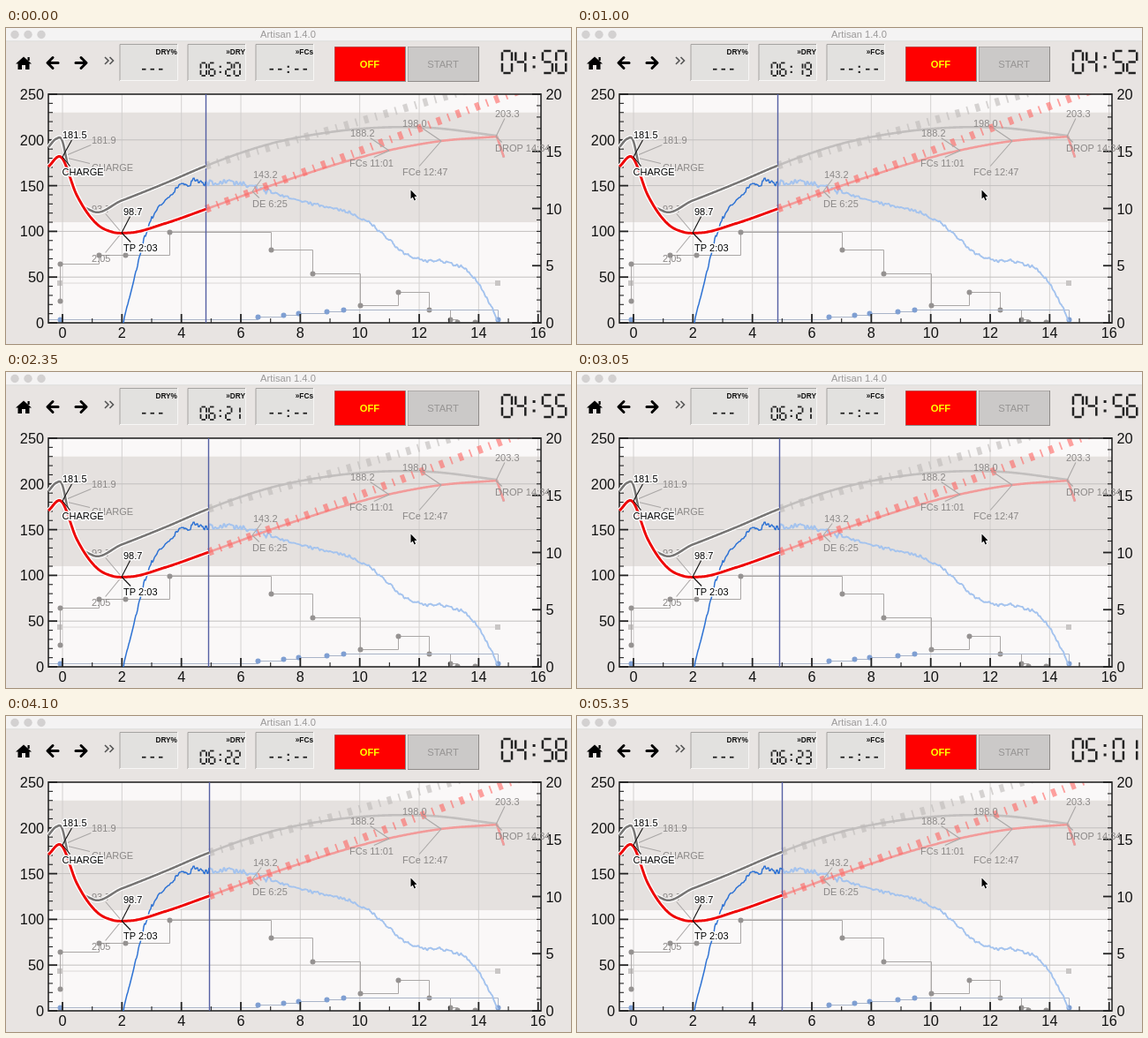
Write an HTML page with a canvas that moves like this. It is 640 by 358 pixels and loops after 5400 ms.

```html
<!DOCTYPE html>
<html lang="en">
<head>
<meta charset="utf-8">
<title>Artisan 1.4.0</title>
<style>
  html, body { margin: 0; width: 100%; height: 100%; overflow: hidden; background: #e8e4e2; }
  canvas { display: block; width: 640px; height: 358px; }
</style>
</head>
<body>
<canvas id="stage"></canvas>
<script>
const LOOP = 5400, W = 640, H = 358;
const FONT = '"Liberation Sans", Arial, sans-serif';
const box = { l: 48, t: 75, r: 606, b: 334 };
const canvas = document.getElementById('stage');
const dpr = window.devicePixelRatio || 1;
canvas.width = W * dpr;
canvas.height = H * dpr;
const c = canvas.getContext('2d');

const minX = m => 64 + 33.67 * m;
const tempY = v => box.b - v * 1.036;
const rateY = v => box.b - v * 12.95;

// Smooth function through key points [x, y, x, y, ...]
function spline(p) {
  const n = p.length / 2, X = i => p[2 * i], Y = i => p[2 * i + 1];
  const rise = i => (Y(i + 1) - Y(i)) / (X(i + 1) - X(i));
  const slope = i => {
    if (i === 0) return rise(0);
    if (i === n - 1) return rise(n - 2);
    const a = X(i) - X(i - 1), b = X(i + 1) - X(i);
    return (rise(i - 1) * b + rise(i) * a) / (a + b);
  };
  return x => {
    let i = 0;
    while (i < n - 2 && x > X(i + 1)) i++;
    const h = X(i + 1) - X(i), u = (x - X(i)) / h, v = 1 - u;
    return (1 + 2 * u) * v * v * Y(i) + u * v * v * h * slope(i) +
      u * u * (3 - 2 * u) * Y(i + 1) - u * u * v * h * slope(i + 1);
  };
}

const drop = x => 3 * Math.max(0, x - 556);
const envBase = spline([48, 135, 57, 125.5, 63, 126, 71, 160, 82, 193, 98, 207.5, 131, 195.5,
  180, 176, 227, 156, 300, 131, 360, 119, 480, 113, 556, 122]);
const beanBase = spline([48, 157, 62, 146, 80, 189, 104, 223, 120, 231, 140, 232, 180, 221.5,
  227, 205, 325, 170, 434, 138.5, 493, 128, 556, 123]);
const rateBase = spline([133, 334, 143, 293, 160, 229, 180, 195, 205, 177, 235, 174, 330, 195,
  410, 220, 450, 254, 541, 299, 557, 331]);
const envTemp = x => envBase(x) + drop(x);
const beanTemp = x => beanBase(x) + drop(x);

function noise(i) {
  const s = Math.sin(i * 127.1 + 11.7) * 43758.5453;
  return (s - Math.floor(s)) * 2 - 1;
}
const rate = x => rateBase(x) + (x > 145 && x < 300 ? 5 : 2.2) *
  (noise(Math.floor(x / 2)) * 0.6 + noise(Math.floor(x / 5) + 500) * 0.4);

function path(pts, color, width) {
  c.beginPath();
  for (let i = 0; i < pts.length; i += 2) c.lineTo(pts[i], pts[i + 1]);
  c.strokeStyle = color;
  c.lineWidth = width;
  c.stroke();
}
function rect(x, y, w, h, color) {
  c.fillStyle = color;
  c.fillRect(x, y, w, h);
}
function dot(x, y, r, color) {
  c.fillStyle = color;
  c.beginPath();
  c.arc(x, y, r, 0, 7);
  c.fill();
}
function text(s, x, y, size, color, align = 'left', weight = '') {
  c.font = `${weight} ${size}px ${FONT}`;
  c.textAlign = align;
  c.fillStyle = color;
  c.fillText(s, x, y);
}
function plot(f, from, to, color, width, halo) {
  const pts = [];
  for (let x = from; x < to; x++) pts.push(x, f(x));
  pts.push(to, f(to));
  c.lineJoin = 'round';
  if (halo) path(pts, '#fff', width + halo);
  path(pts, color, width);
  c.lineJoin = 'miter';
}

// Seven-segment display; bits are a..g
const SEGMENTS = { 0: 63, 1: 6, 2: 91, 3: 79, 4: 102, 5: 109, 6: 125, 7: 7, 8: 127, 9: 111, '-': 64, ' ': 0 };
function lcd(s, x, y, w, h, step, t) {
  const m = h / 2, g = t * 0.55;
  const lines = [[g, 0, w - g, 0], [w, g, w, m - g], [w, m + g, w, h - g], [g, h, w - g, h],
    [0, m + g, 0, h - g], [0, g, 0, m - g], [g, m, w - g, m]];
  [...s].forEach((ch, i) => {
    const ox = x + i * step;
    if (ch === ':') {
      for (const k of [0.3, 0.72]) rect(ox + w / 2 - t * 0.6, y + h * k - t * 0.6, t * 1.2, t * 1.2, '#222');
      return;
    }
    lines.forEach((p, b) => {
      if (SEGMENTS[ch] >> b & 1) path([ox + p[0], y + p[1], ox + p[2], y + p[3]], '#222', t);
    });
  });
}
const clock = s => `0${Math.floor(s / 60)}:${String(s % 60).padStart(2, '0')}`;

function panel(x, label, value) {
  rect(x, 18, 66, 42, '#e2e1df');
  path([x, 60, x, 18.5, x + 66, 18.5], '#a5a3a1', 1);
  path([x, 59.5, x + 65.5, 59.5, x + 65.5, 18], '#f7f6f5', 1);
  text(label, x + 65, 30, 8.3, '#111', 'right', 'bold');
  lcd(value, x + 14.5, 39.5, 6.5, 14.5, 9.5, 1.8);
}

function button(x, label, fill, color, weight) {
  rect(x, 21, 81, 40, '#8f8b89');
  rect(x + 0.5, 21.5, 79.5, 38.5, fill);
  text(label, x + 40, 45, 11.2, color, 'center', weight);
}

function arrowIcon(x, dir) {
  c.lineCap = c.lineJoin = 'round';
  path([x - dir * 6, 39.5, x + dir * 5, 39.5], '#000', 3);
  path([x, 33.5, x + dir * 6, 39.5, x, 45.5], '#000', 3);
  c.lineCap = 'butt';
  c.lineJoin = 'miter';
}

function homeIcon(x, y) {
  c.fillStyle = '#000';
  c.beginPath();
  c.moveTo(x - 9, y);
  c.lineTo(x, y - 8);
  c.lineTo(x + 9, y);
  c.fill();
  rect(x - 6.5, y - 1, 4.5, 7.5, '#000');
  rect(x + 2, y - 1, 4.5, 7.5, '#000');
  rect(x - 3, y - 1, 6, 2.5, '#000');
  rect(x + 4.5, y - 7.5, 2.2, 4, '#000');
}

function toolbar(sec, dry) {
  rect(0, 0, W, H, '#e8e4e2');
  rect(0, 0, W, 15, '#f4f3f3');
  rect(0, 14.5, W, 0.7, '#d6d4d3');
  for (const x of [10, 25, 40]) dot(x, 7.5, 4.7, '#d3d1d1');
  text('Artisan 1.4.0', 319.5, 11, 11.2, '#9a9898', 'center');

  homeIcon(20, 40.5);
  arrowIcon(53, -1);
  arrowIcon(85, 1);
  for (const x of [112, 117.5]) path([x, 33, x + 4, 37, x, 41], '#555', 1.6);

  panel(129, 'DRY%', ' --- ');
  panel(206, '»DRY', clock(dry));
  panel(283, '»FCs', '--:--');
  button(372, 'OFF', '#ff0000', '#ffff00', 'bold');
  button(455, 'START', '#cbc9c8', '#979594');
  lcd(clock(sec), 562, 26, 11, 25, 15.3, 2.5);
}

function backdrop() {
  rect(box.l, box.t, box.r - box.l, box.b - box.t, '#faf8f8');
  rect(box.l, tempY(230), box.r - box.l, tempY(110) - tempY(230), '#e5e1df');
  for (let m = 0; m <= 16; m += 2) path([minX(m), box.t, minX(m), box.b], '#d0cdcc', 0.9);
  for (let v = 50; v < 250; v += 50) path([box.l, tempY(v), box.r, tempY(v)], '#c3c0bf', 1);
}

function axes() {
  c.strokeStyle = '#333';
  c.lineWidth = 1.7;
  c.strokeRect(box.l, box.t, box.r - box.l, box.b - box.t);
  const tick = (x, y, dx, dy, major) => {
    const n = major ? 10 : 5;
    path([x, y, x + dx * n, y + dy * n], '#222', major ? 1.8 : 1.1);
  };
  for (let m = 0; m <= 16; m++) {
    tick(minX(m), box.b, 0, -1, m % 2 === 0);
    if (m % 2 === 0) text(m, minX(m), 350.8, 16.3, '#111', 'center');
  }
  for (let v = 0; v <= 250; v += 10) {
    tick(box.l, tempY(v), 1, 0, v % 50 === 0);
    if (v % 50 === 0) text(v, 43, tempY(v) + 6, 16.3, '#111', 'right');
  }
  for (let v = 0; v <= 20; v++) {
    tick(box.r, rateY(v), -1, 0, v % 5 === 0);
    if (v % 5 === 0) text(v, 611.5, rateY(v) + 6, 16.3, '#111');
  }
}

const heat = [61, 309, 61, 267, 105, 257, 135, 257, 185, 231, 300, 251, 347, 278, 401, 314,
  444, 299, 479, 319, 503, 330, 511, 333, 531, 333];
const air = [61, 330, 285, 327, 314, 325, 331, 323, 363, 321, 382, 319, 557, 330];

function steps(p, color, dotColor, start) {
  c.save();
  c.translate(0.5, 0.5);
  const line = [start, p[1]];
  for (let i = 0; i < p.length; i += 2) line.push(p[i], line[line.length - 1], p[i], p[i + 1]);
  path(line, color, 1);
  for (let i = 0; i < p.length; i += 2) dot(p[i], p[i + 1], 3, dotColor);
  c.restore();
}

function events() {
  path([61, 289, 557, 289], '#dbd8d7', 1);
  for (const x of [61, 557]) rect(x - 3, 286, 6, 6, '#c9c6c5');
  steps(heat, '#aaa7a6', '#959291', 61);
  steps(air, '#a9b4c8', '#7f9fd2', 48);
}

// Wide dash-dot line heading along a constant slope, up to the top edge
function projection(x, y, slope, color) {
  const top = box.t - 12;
  c.setLineDash([5.1, 8.2, 1.8, 8.2]);
  path([x, y, x + (top - y) / slope, top], color, 9);
  c.setLineDash([]);
}

// Labels [text, x, y], each tied to the anchor by a line that stops at the label
function note(ax, ay, labels, live) {
  c.font = `11px ${FONT}`;
  c.textAlign = 'left';
  for (const [s, x, y] of labels) {
    const w = c.measureText(s).width;
    const dx = x + Math.min(w / 2, 14) - ax, dy = y - 4 - ay;
    const reachX = ax < x - 2 ? (x - 2 - ax) / dx : 0;
    const k = Math.max(reachX, 1 - 6 / Math.abs(dy));
    path([ax, ay, ax + dx * Math.min(1, k), ay + dy * Math.min(1, k)], live ? '#111' : '#aaa7a6', 1.1);
    if (live) {
      c.strokeStyle = '#fff';
      c.lineWidth = 3;
      c.lineJoin = 'round';
      c.strokeText(s, x, y);
      c.lineJoin = 'miter';
    }
    text(s, x, y, 11, live ? '#000' : '#8b8887');
  }
}

function pastNotes() {
  note(64, 146, [['181.9', 97, 130.5], ['CHARGE', 97, 161.5]]);
  note(131, 232, [['93.7', 97, 208.5], ['2:05', 97, 264.5]]);
  note(279, 185, [['143.2', 280, 169.5], ['DE 6:25', 279, 202.5]]);
  note(434, 139, [['188.2', 390, 122.5], ['FCs 11:01', 389, 156.5]]);
  note(493, 128, [['198.0', 449, 111.5], ['FCe 12:47', 449, 166.5]]);
  note(555, 123, [['203.3', 554, 100.5], ['DROP 14:34', 554, 139.5]]);
}

function pointer(x, y) {
  c.beginPath();
  for (const [dx, dy] of [[0, 0], [0, 10], [2.3, 8], [4, 12], [5.5, 11.2], [4, 7.5], [7, 7.2]]) c.lineTo(x + dx, y + dy);
  c.closePath();
  c.strokeStyle = '#fff';
  c.lineWidth = 1.5;
  c.stroke();
  c.fillStyle = '#000';
  c.fill();
}

// Seconds left to DRY: slow rise with a short dip around the third reading
const dryLeft = n => 380 + Math.floor(0.28 * n + 0.01 - 3.6 * Math.exp(-((n - 3) ** 2)));

function draw(t) {
  c.setTransform(dpr, 0, 0, dpr, 0, 0);
  const n = Math.floor(0.2 + t * 0.00206);
  const sec = 290 + n;
  const now = Math.floor(minX(sec / 60) - 0.3) + 0.5;

  toolbar(sec, dryLeft(n));
  backdrop();
  c.save();
  c.beginPath();
  c.rect(box.l, box.t, box.r - box.l, box.b - box.t);
  c.clip();
  events();
  plot(rate, now, 557, '#a4c3ee', 1.9);
  plot(envTemp, now, 564, '#c2bfbe', 2.6);
  plot(beanTemp, now, 564, '#f29b9a', 2.6);
  projection(now, envTemp(now), -0.29, 'rgba(190,187,186,.62)');
  projection(now, beanTemp(now), -0.378, 'rgba(255,100,98,.6)');
  c.restore();
  axes();
  pastNotes();

  path([now, box.t, now, box.b], '#5560a4', 1.4);
  plot(rate, 133, now, '#2f73d4', 1.5);
  plot(envTemp, box.l, now, '#777574', 2.6, 2.4);
  plot(beanTemp, box.l, now, '#ee0808', 3, 2.4);
  note(64, 146, [['181.5', 64, 125], ['CHARGE', 63.5, 166.5]], true);
  note(131, 232, [['98.7', 133, 211.5], ['TP 2:03', 133, 252.5]], true);
  pointer(458.5, 183.5);
}

const begin = performance.now();
function frame() {
  draw((performance.now() - begin) % LOOP);
  requestAnimationFrame(frame);
}
frame();
</script>
</body>
</html>
```
